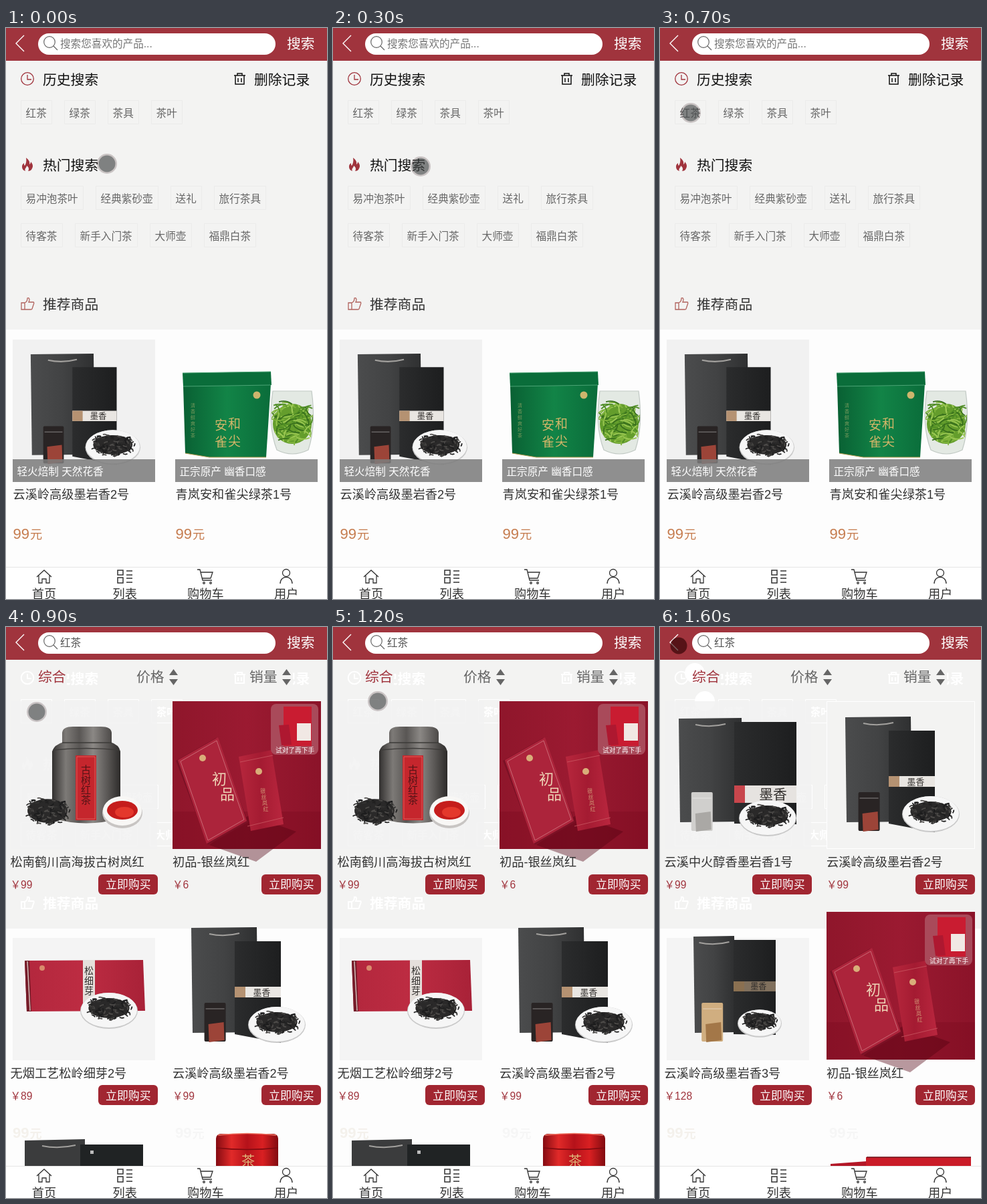
These frames come from a looping animation (480x854 px, 2000 ms). An HTML page with a canvas:

```html
<!DOCTYPE html>
<html lang="zh-CN">
<head>
<meta charset="utf-8">
<style>
html, body { margin: 0; width: 480px; height: 854px; overflow: hidden; background: #fdfdfd; }
canvas { display: block; }
</style>
</head>
<body>
<canvas width="480" height="854"></canvas>
<script>
const ctx = document.querySelector('canvas').getContext('2d');
const FONT = '"Liberation Sans", "Noto Sans CJK SC", "Noto Sans CJK", sans-serif';
const RED = '#a0343d', GREY = '#f3f3f2', INK = '#333';

// Drawing helpers
function text(s, x, cy, size, color, weight = '') {
  ctx.font = `${weight} ${size}px ${FONT}`;
  ctx.fillStyle = color;
  ctx.fillText(s, x, cy + size * 0.38);
}
function column(s, x, y, step, size, color, lean = 0) {
  [...s].forEach((c, i) => text(c, x + i * lean, y + i * step, size, color));
}
function rect(color, x, y, w, h, r = 0) {
  ctx.fillStyle = color;
  ctx.beginPath();
  ctx.roundRect(x, y, w, h, r);
  ctx.fill();
}
function shape(color, d) {
  ctx.fillStyle = color;
  ctx.fill(new Path2D(d));
}
// Parallelogram from a corner and its two edges
const slab = (color, x, y, ux, uy, vx, vy) =>
  shape(color, `M${x} ${y}l${ux} ${uy}l${vx} ${vy}l${-ux} ${-uy}z`);
function oval(color, x, y, rx, ry = rx) {
  ctx.fillStyle = color;
  ctx.beginPath();
  ctx.ellipse(x, y, rx, ry, 0, 0, 7);
  ctx.fill();
}
function line(color, d, width = 1.3) {
  ctx.strokeStyle = color;
  ctx.lineWidth = width;
  ctx.stroke(new Path2D(d));
}
function ring(color, x, y, r, width = 1.3) {
  ctx.strokeStyle = color;
  ctx.lineWidth = width;
  ctx.beginPath();
  ctx.arc(x, y, r, 0, 7);
  ctx.stroke();
}
function across(x, w, ...colors) {
  const g = ctx.createLinearGradient(x, 0, x + w, 0);
  colors.forEach((c, i) => g.addColorStop(i / (colors.length - 1), c));
  return g;
}
function at(x, y, scale, draw) {
  ctx.save();
  ctx.translate(x, y);
  ctx.scale(scale, scale);
  draw();
  ctx.restore();
}

// Loose leaves scattered in an ellipse
function leaves(x, y, rx, ry, count, length, colors) {
  let seed = 7;
  const rnd = () => (seed = seed * 16807 % 2147483647) / 2147483647;
  for (let i = 0; i < count; i++) {
    const a = rnd() * 6.3, d = Math.sqrt(rnd()), b = rnd() * 6.3;
    const px = x + Math.cos(a) * d * rx, py = y + Math.sin(a) * d * ry;
    const dx = Math.cos(b) * length, dy = Math.sin(b) * length * 0.7;
    line(colors[i % colors.length],
      `M${px - dx} ${py - dy}Q${px + dy / 2} ${py - dx / 2} ${px + dx} ${py + dy}`, 1.8);
  }
}
function teaPile(x, y, rx, ry) {
  oval('#2a2929', x, y, rx * 0.88, ry * 0.85);
  leaves(x, y, rx, ry, 90, 3.4, ['#1c1c1d', '#343332', '#222', '#4c4a48']);
}
function plate(x, y, r) {
  oval('#c9c9c9', x, y + 1, r + 1, r * 0.62 + 1);
  oval('#f6f6f6', x, y, r, r * 0.62);
  teaPile(x, y - 3, r * 0.83, r * 0.42);
}

// Gift sets inside a 222px photo: a bag, a tall box, a pouch and a plate
const LOOKS = {
  dark: { bag: [28, 24, 98], box: [93, 44, 69], drop: 12, label: [112, 16], plate: [156, 168, 42],
    end: '#b59272', paper: '#e9e6e2', foil: '#292424', seal: '#9c4438' },
  silver: { bag: [21, 26, 94], box: [104, 31, 93], drop: 0, label: [126, 26], plate: [154, 174, 42],
    end: '#c8464c', paper: '#e6e3e0', foil: '#d0cfcd', seal: '#aaa8a5' },
  gold: { bag: [43, 37, 61], box: [103, 42, 63], drop: 0, label: [104, 15], plate: [142, 166, 32],
    end: '#8a7051', paper: '#80705d', foil: '#d0ae80', seal: '#a37748' }
};
function giftSet(name, x, y, scale = 1) {
  const { bag: [bx, by, bw], box: [fx, fy, fw], drop, label: [ly, lh], plate: dish, end, paper, foil, seal } = LOOKS[name];
  at(x, y, scale, () => {
    slab(across(bx, bw, '#4b4c4d', '#424344', '#2f3031'), bx, by, bw, -1, 2, 181 - by);
    line('#a2a09d', `M${bx + bw / 2 - 22} ${by + 9}q22 5 45 -1`, 2.2);
    shape(across(fx, fw, '#2b2c2d', '#1d1e1f'), `M${fx} ${fy}h${fw}V${184 + drop}L${fx} 183z`);
    rect(paper, fx, ly, fw, lh);
    rect(end, fx, ly, 16, lh);
    text('墨香', fx + fw * 0.4, ly + lh / 2, lh * 0.8, '#302d2b');
    at(bx + bw * 0.2, 136, 1, () => {
      rect(foil, 0, 0, 32, 58, 2);
      line('rgba(255,255,255,.35)', 'M2 9h28');
      slab(seal, 6, 32, 23, -3, 1, 27);
    });
    plate(...dish);
  });
}
function canister() {
  const metal = across(69, 102, '#32302f', '#7d7a77', '#595654', '#8b8885', '#5d5a58', '#2d2b2a');
  shape(metal, 'M69 186Q72 176 86 172H156Q169 176 171 186V286Q120 301 69 286z');
  shape(metal, 'M84 173V158Q85 149 100 149H142Q157 149 158 158V173z');
  line('#3d3b39', 'M84 173h74M70 184q50 -5 100 0');
  rect('#c5262d', 104, 192, 31, 97);
  line('#e26b62', 'M106 194h27v93h-27z', 0.8);
  column('古树红茶', 112, 213, 15, 15, '#541316');
  teaPile(62, 275, 34, 21);
  oval('#c8c5c3', 174, 278, 30, 23);
  oval('#f8f7f5', 174, 275, 29, 22);
  oval('#c51d1c', 174, 274, 23, 14);
  oval('#e4382c', 177, 277, 14, 8);
}
function redGift(y) {
  at(249, y, 1, () => {
    rect(across(0, 222, '#8f162b', '#9b1a31', '#8b1329'), 0, 0, 222, 221);
    rect('rgba(120,10,30,.35)', 0, 165, 222, 56);
    slab('rgba(80,0,15,.4)', 55, 215, 60, -45, 70, 25);
    slab('#7b1125', 5, 89, 60, -34, 48, 126);
    slab('#ac243b', 8, 88, 60, -34, 43, 125);
    slab(across(99, 66, '#b7273d', '#a41b32', '#b9263e'), 99, 83, 49, -10, 18, 111);
    line('#d27a83', 'M12 90l54 -31l41 118l-54 31z', 0.8);
    line('#c95863', 'M101 91l49 -10M112 187l54 -13', 0.8);
    oval('#d9ae79', 45, 85, 5);
    oval('#d9ae79', 129, 105, 5);
    column('初品', 59, 116, 23, 22, '#eed4b6', 12);
    column('银丝岚红', 131, 134, 9, 8, '#d29b78', 1.5);
    rect('#a94a5a', 147, 4, 71, 76, 8);
    rect('#c91c31', 166, 8, 42, 59);
    rect('#f1e8e4', 186, 33, 21, 26);
    slab('#ae1830', 159, 36, 15, -1, 4, 30);
    text('试对了再下手', 154, 73, 9.7, '#fff');
  });
}
function flatBox() {
  slab(across(28, 177, '#b3273d', '#bd2c42', '#a92238'), 28, 499, 177, -1, 3, 76);
  slab('#741c29', 28, 499, 7, 0, 3, 76);
  line('#d3bdb9', 'M32 500l4 74', 1.5);
  rect('#e5dfdb', 115, 498, 18, 66);
  column('松细芽', 117, 514, 15, 14, '#33302e');
  oval('#d98a6c', 54, 510, 4);
  plate(154, 573, 42);
}
function greenTin() {
  shape(across(264, 133, '#096033', '#128447', '#0a6c3a'), 'M265 535L396 532L389 642H304L268 636z');
  slab('#0a6d3a', 264, 516, 132, -2, 1, 20);
  line('#4ba475', 'M264 516l132 -2M265 536l131 -2', 1);
  line('#b49b50', 'M268 636L304 642H389', 1.2);
  oval('#cdb56d', 375, 549, 5.5);
  column('安雀', 312, 594, 25, 19, '#d1b568');
  column('和尖', 332, 592, 26, 19, '#d1b568');
  column('清香鲜爽好茶', 276, 564, 9, 7, '#78995d');
  const glass = 'M399 543Q391 595 405 631Q428 643 452 631Q464 595 457 543z';
  shape('#e3e9e3', glass);
  ctx.save();
  ctx.clip(new Path2D(glass));
  oval('#649d2c', 428, 592, 29, 30);
  leaves(428, 588, 29, 31, 80, 10, ['#4e8c24', '#80b43c', '#9bc853', '#39701d']);
  ctx.restore();
  line('#c1c9c4', glass, 1.2);
}

// Search page headings and tags; the pale version shows through the results
function searchTop(pale) {
  const ink = c => pale ? '#fff' : c, weight = pale ? 'bold' : '', w = pale ? 2 : 1.3;
  const head = (s, x, y, c = '#111') => text(s, x, y, 20.8, ink(c), weight);
  ring(ink(RED), 32, 76, 9.3, w);
  line(ink(RED), 'M32 70v7h6', w);
  head('历史搜索', 55, 77);
  line(ink('#111'), 'M341 71h17M346 71v-3h7v3M343 71v13h13v-13M347 75v6M352 75v6', w + 0.2);
  head('删除记录', 371, 77);
  shape(ink(RED), 'M30 194c4 3 6 6 5 10 2-1 2-3 2-4 3 3 4 7 2 10-1 3-4 4-6 4 2-3 1-6-2-8 0 3-4 4-2 8-3-1-5-3-5-7 0-3 2-4 3-5 0 2 0 3 1 4 2-3 3-7 2-12z');
  head('热门搜索', 55, 205);
  line(ink('#b0625c'), 'M23 411h5v10h-5zM28 411c3-1 4-4 4-7 3-1 4 2 2 6h7c1 0 1 2 0 4l-2 6c0 1-1 1-2 1h-9', w);
  head('推荐商品', 55, 413, INK);
  tags(108, '红茶 绿茶 茶具 茶叶');
  tags(236, '易冲泡茶叶 经典紫砂壶 送礼 旅行茶具');
  tags(292, '待客茶 新手入门茶 大师壶 福鼎白茶');

  function tags(y, words) {
    let x = 22;
    for (const word of words.split(' ')) {
      const width = Math.round(word.length * 15.6 + 15);
      line(ink('#ebebea'), `M${x + 0.5} ${y + 0.5}h${width}v35h${-width}z`, 1);
      text(word, x + 7.6, y + 19.5, 15.6, ink('#666'), weight);
      x += width + 19;
    }
  }
}
function price(x, color, weight) {
  text('99', x, 756, 22.1, color, weight);
  text('元', x + 25.5, 757, 18.2, color, weight);
}
function searchPage() {
  searchTop(false);
  rect('#f1f1f1', 10, 466, 213, 213);
  giftSet('dark', 10, 465, 0.96);
  greenTin();
  const cards = ['轻火焙制 天然花香|云溪岭高级墨岩香2号', '正宗原产 幽香口感|青岚安和雀尖绿茶1号'];
  cards.forEach((card, i) => {
    const [note, title] = card.split('|'), x = 10 + 243 * i;
    rect('rgba(125,125,125,.86)', x, 645, 213, 34);
    text(note, x + 6.5, 663, 15.6, '#fff');
    text(title, x + 0.5, 697, 18.2, INK);
    price(x + 0.5, '#c67d50');
  });
}

function firstList() {
  canister();
  redGift(111);
  flatBox();
  giftSet('dark', 249, 426);
  slab('#3b3c3d', 28, 768, 90, -2, 0, 45);
  line('#a2a09d', 'M54 776q24 5 50 -1', 2);
  rect('#202324', 111, 774, 94, 34);
  rect('#bbb', 126, 783, 5, 5);
  rect(across(314, 93, '#850b12', '#e12a29', '#b5121a', '#d92022', '#820b10'), 314, 758, 93, 50, [7, 7, 0, 0]);
  line('#f07a68', 'M317 760q44 -5 87 0');
  line('#7d0a10', 'M314 779q46 5 93 0');
  text('茶', 352, 798, 20, '#dfb579');
}
function secondList() {
  giftSet('silver', 7, 111);
  rect(GREY, 249, 111, 222, 221);
  line('#fff', 'M249.5 111.5h221v220h-221z', 1);
  giftSet('dark', 249, 111);
  giftSet('gold', 7, 426);
  redGift(426);
  slab('#b31727', 255, 803, 55, -4, 0, 20);
  rect('#ca1c28', 308, 793, 157, 20);
  line('#6c1018', 'M309 793h156', 1.5);
}
const FIRST = '松南鹤川高海拔古树岚红￥99 初品-银丝岚红￥6 无烟工艺松岭细芽2号￥89 云溪岭高级墨岩香2号￥99';
const SECOND = '云溪中火醇香墨岩香1号￥99 云溪岭高级墨岩香2号￥99 云溪岭高级墨岩香3号￥128 初品-银丝岚红￥6';

function resultsPage(t) {
  const second = t >= 1300;
  searchTop(true);
  rect(GREY, 44, 58, 47, 34);
  rect(GREY, 361, 58, 68, 34);
  // The pointer leaves pale spots where it rested
  for (const rest of [1200, 1300]) if (t > rest && second) oval('#fff', ...position(rest), 15);
  rect('rgba(243,243,242,.85)', 7, 111, 219, 221);
  rect(GREY, 7, 332, 465, 70);
  rect('#f4f4f4', 10, 465, 213, 183);
  price(10, '#f4f1ec', 'bold');
  price(253, '#f6f6f6', 'bold');

  text('综合', 48, 74, 20.8, RED);
  ['价格', '销量'].forEach((s, i) => {
    const x = 195 + 169 * i;
    text(s, x, 74, 20.8, '#666');
    shape('#666', `M${x + 49} 72h13l-6.5 -9zM${x + 49} 78h13l-6.5 9z`);
  });

  (second ? secondList : firstList)();
  (second ? SECOND : FIRST).split(' ').forEach((item, i) => {
    const [title, cost] = item.split('￥'), side = i % 2, row = i >> 1;
    const x = 6.5 + 242.5 * side, y = 316 * row;
    text(title, x, 351.5 + y, 18.2, INK);
    text('￥' + cost, x, 385.5 + y, 15.6, RED);
    rect('#a12631', 138 + 244 * side, 370 + 315 * row, 89, 30, 6);
    text('立即购买', 149 + 244 * side, 385 + y, 16.9, '#fff');
  });
}

function header(query, color) {
  rect(RED, 0, 0, 480, 49);
  line('#fff', 'M27 11L15 23L27 35', 1.4);
  rect('#fff', 48, 8, 355, 32, 16);
  ring('#666', 65, 21, 8.3, 1.2);
  line('#666', 'M71 27L77 33');
  text(query, 81, 23.5, 15.6, color);
  text('搜索', 420, 23.5, 20.8, '#fff');
}
function tabBar() {
  rect('#fff', 0, 806, 480, 48);
  rect('#e6e6e6', 0, 806, 480, 1);
  line(INK, 'M46 821l11-10 11 10M49 819v11h5v-6h6v6h5v-11');
  line(INK, 'M167 811h8v7h-8zM167 822h8v8h-8zM180 812h9M180 818h9M180 823h9M180 829h9', 1.5);
  line(INK, 'M286 810h4l4 16h14M291 814h18l-3 9h-13');
  ring(INK, 296, 830, 1.3);
  ring(INK, 306, 830, 1.3);
  ring(INK, 419, 815, 5.5);
  line(INK, 'M410 831c0-13 18-13 18 0');
  ['首页', '列表', '购物车', '用户'].forEach((s, i) =>
    text(s, 57 + 120.7 * i - s.length * 9.1, 846.5, 18.2, INK));
}

// Pointer stops: time, x, y
const STOPS = [[0, 151, 203], [200, 148, 204], [300, 131, 207], [700, 46, 127], [900, 46, 127],
  [1200, 67, 111], [1300, 52, 69], [1500, 28, 28], [2000, 28, 28]];
function position(t) {
  const i = STOPS.findIndex(s => s[0] > t);
  const [t0, x0, y0] = STOPS[i - 1], [t1, x1, y1] = STOPS[i], k = (t - t0) / (t1 - t0);
  return [x0 + (x1 - x0) * k, y0 + (y1 - y0) * k];
}
function pointer(t) {
  const [x, y] = position(t), onHeader = y < 49;
  if (!onHeader) oval('rgba(70,45,50,.24)', x, y, 15);
  oval(onHeader ? 'rgba(40,0,0,.62)' : 'rgba(65,75,75,.55)', x, y, 12.5);
}

function draw(t) {
  rect('#fdfdfd', 0, 0, 480, 854);
  rect(GREY, 0, 49, 480, 402);
  const found = t >= 900;
  if (found) resultsPage(t);
  else searchPage();
  header(found ? '红茶' : '搜索您喜欢的产品...', found ? '#555' : '#777');
  tabBar();
  pointer(t);
}

const start = performance.now();
let shown = -1;
function tick() {
  const t = Math.floor((performance.now() - start) % 2000 / 100) * 100;
  if (t !== shown) draw(shown = t);
  requestAnimationFrame(tick);
}
tick();
</script>
</body>
</html>
```
